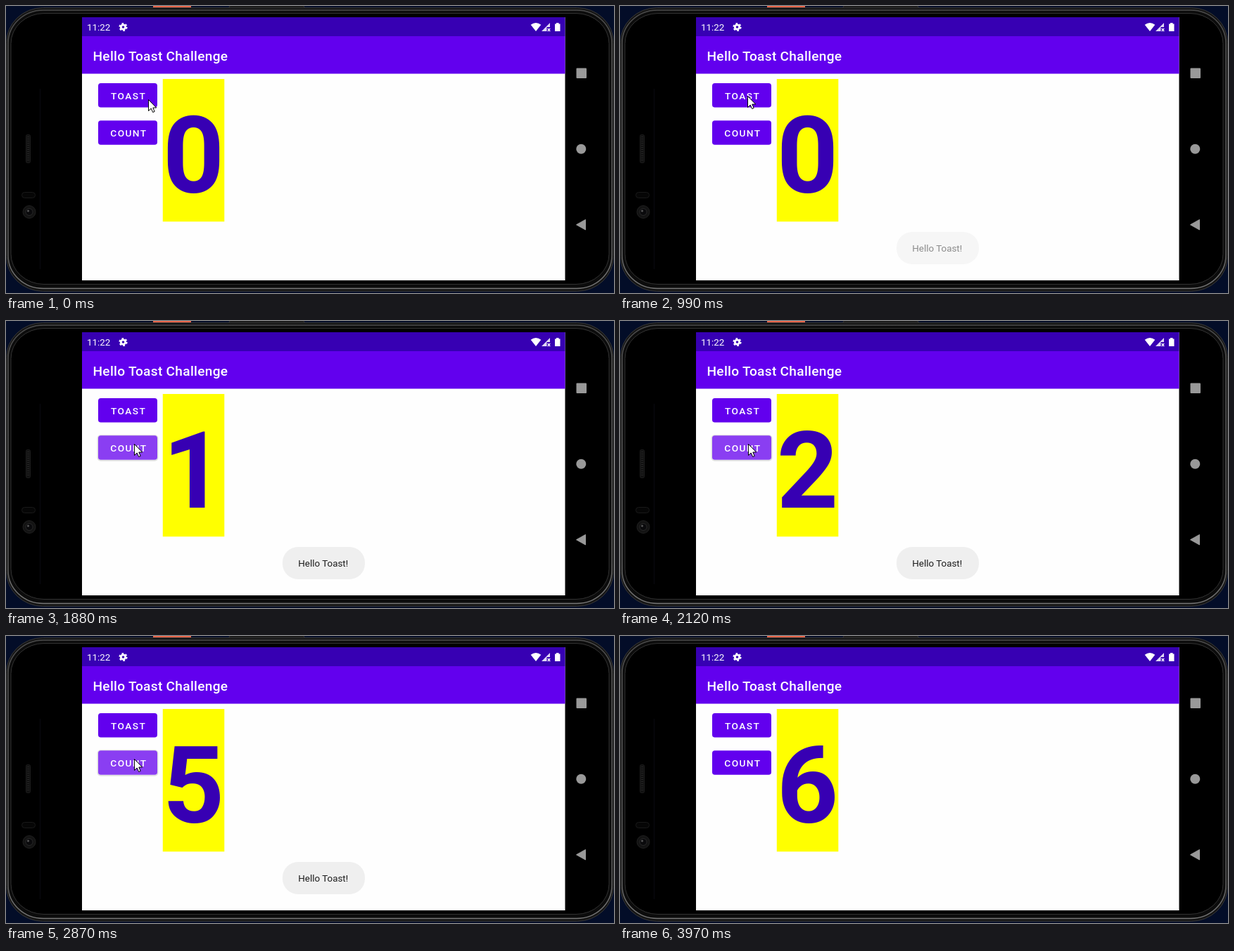
Animation of 864x409 px, one loop 4220 ms. Source, as an HTML page:

```html
<!DOCTYPE html>
<html lang="en">
<head>
<meta charset="utf-8">
<title>Hello Toast Challenge</title>
<style>
  html, body { margin: 0; width: 100%; height: 100%; overflow: hidden; background: #030d28; }
  svg { display: block; width: 864px; height: 409px; font-family: Roboto, sans-serif; }
  .label { font-size: 13.4px; fill: #fff; }
  .title { font-size: 19.1px; font-weight: 500; letter-spacing: .3px; fill: #fff; }
  .button text { font-size: 13.7px; font-weight: 500; letter-spacing: 1.4px; fill: #fff; }
  .halo { fill: none; stroke: #000; stroke-opacity: .12; stroke-width: 2; }
</style>
</head>
<body>
<svg viewBox="0 0 864 409">
  <defs>
    <linearGradient id="rim" x2="0" y2="1">
      <stop offset="0" stop-color="#4a4a4a"/>
      <stop offset=".15" stop-color="#555"/>
      <stop offset=".85" stop-color="#5c5c5c"/>
      <stop offset="1" stop-color="#777"/>
    </linearGradient>
  </defs>

  <!-- Phone body -->
  <path d="M209 0h54v4h-54z" fill="#e8674b"/>
  <rect x="317" width="107" height="6" rx="2" fill="#111" stroke="#333"/>
  <rect x=".5" y="2.5" width="863" height="404" rx="52" ry="50" fill="#151515" stroke="#383838"/>
  <rect x="3" y="6" width="858" height="396.500" rx="50" ry="47" fill="#0c0c0c" stroke="url(#rim)" stroke-width="1.5"/>
  <rect x="7" y="10.500" width="850" height="386" rx="47" ry="43" stroke="#333"/>
  <path d="M48.5 118V375" stroke="#090910"/>
  <rect x="28.5" y="183.500" width="6" height="40" rx="2" fill="#111" stroke="#1d1d1d"/>
  <path d="M31.5 186v36" stroke="#262626" stroke-width="3" stroke-dasharray="1 2"/>
  <rect x="22.5" y="265.500" width="19" height="8" rx="4" fill="#060606" stroke="#191919"/>
  <circle cx="33" cy="293.500" r="9" fill="#131313" stroke="#202020"/>
  <circle cx="33" cy="293.500" r="5" fill="#0a0a0c" stroke="#282828"/>
  <circle cx="31.500" cy="292" r="1.500" fill="#555"/>

  <!-- App -->
  <path d="M108 16h686.500v375H108z" fill="#fefefe"/>
  <path d="M108 16h686.500v27H108z" fill="#3700b3"/>
  <path d="M108 43h686.500v53.500H108z" fill="#6200ee"/>
  <text class="label" x="115" y="35">11:22</text>
  <text class="title" x="123.500" y="77.500">Hello Toast Challenge</text>
  <g fill="none" stroke="#fff">
    <circle cx="166.500" cy="30" r="3.200" stroke-width="2.800"/>
    <circle cx="166.500" cy="30" r="5.200" stroke-width="1.800" stroke-dasharray="2.720"/>
  </g>
  <g fill="#fff">
    <path d="M753 36l-7.300-9.200q7.300-5.800 14.600 0z"/>
    <path d="M773 24v6h-4.500v6H761z" fill-opacity=".85"/>
    <path d="M769.800 32l3.400 4m0-4l-3.400 4" stroke="#fff" stroke-width="1.200"/>
    <path d="M782 24h3.500v1.500h2V36H780V25.500h2z"/>
  </g>

  <g class="button" id="toastButton" transform="translate(131 110)">
    <rect class="halo" x="-.5" width="85" height="35.500" rx="4"/>
    <rect class="face" width="84" height="34.500" rx="3.800"/>
    <text x="18" y="22.500">TOAST</text>
  </g>
  <g class="button" id="countButton" transform="translate(131 163.200)">
    <rect class="halo" x="-.5" width="85" height="35.500" rx="4"/>
    <rect class="face" width="84" height="34.500" rx="3.800"/>
    <text x="17.300" y="22.500">COUNT</text>
  </g>

  <path d="M222.800 104h87.500v203.200h-87.500z" fill="#ff0"/>
  <text id="count" x="222.800" y="265.500" font-size="152.600" font-weight="700" fill="#3700b3"></text>

  <g id="toast">
    <rect x="393" y="322" width="117" height="46" rx="22" fill="#efefef"/>
    <text x="415.300" y="350.300" font-size="13.400" fill="#1c1c1c">Hello Toast!</text>
  </g>

  <g fill="#999">
    <rect x="810.500" y="88.500" width="14.500" height="14.500" rx="1"/>
    <circle cx="817.300" cy="203.700" r="7"/>
    <path d="M810.500 311.700l13-7.300v14.600z" stroke="#999" stroke-linejoin="round"/>
  </g>

  <path id="cursor" d="M.5.5v16l3.700-3.500 2.500 5.500 2.500-1.100-2.400-5.400h4.900z" fill="#fff" stroke="#000"/>
</svg>
<script>
const LOOP = 4220, STEP = 120, CLICK = 2 * STEP;
const PRESS_COUNT = 1760, LEAVE = 3290;
const el = id => document.getElementById(id);
const between = (t, from, to) => t >= from && t < to;

// Rises from 0 to 1 in equal jumps, the first one at `start`.
const stairs = (t, start, jumps, step = STEP) =>
  Math.min(Math.max(Math.floor((t - start) / step) + 1, 0), jumps) / jumps;

// Pointer goes to TOAST, then to COUNT, then off the stage with short glimpses.
function cursorAt(t) {
  if (t < LEAVE) {
    const toToast = stairs(t, 120, 4), toCount = stairs(t, 1260, 3);
    return [202 - 21 * toToast + toCount, 133 - 5 * toToast + 47 * toCount];
  }
  if (t < LEAVE + STEP) return [807, 290];
  if (between(t, 3700, 3850)) return [854, 342];
  if (between(t, 3850, 3970)) return [824, 388];
  return null;
}

// The ripple is brightest in the second half of every click.
function countPress(t) {
  if (!between(t, PRESS_COUNT, LEAVE + STEP)) return 0;
  return (t - PRESS_COUNT) % CLICK < STEP ? .7 : 1;
}

function paintButton(id, press) {
  const button = el(id);
  button.querySelector('.face').style.fill = `rgb(${98 + 40 * press}, ${62 * press}, ${238 + 4 * press})`;
  button.querySelector('.halo').style.opacity = press;
}

function draw(t) {
  const position = cursorAt(t);
  el('cursor').style.display = position ? '' : 'none';
  if (position) el('cursor').setAttribute('transform', `translate(${position})`);
  el('count').textContent = Math.round(6 * stairs(t, PRESS_COUNT + STEP, 6, CLICK));
  el('toast').style.opacity = stairs(t, 870, 4) - stairs(t, 2990, 3, 150);
  paintButton('toastButton', between(t, 750, 990) ? 1 : 0);
  paintButton('countButton', countPress(t));
}

const begin = performance.now();
function tick() {
  draw((performance.now() - begin) % LOOP);
  requestAnimationFrame(tick);
}
tick();
</script>
</body>
</html>
```
